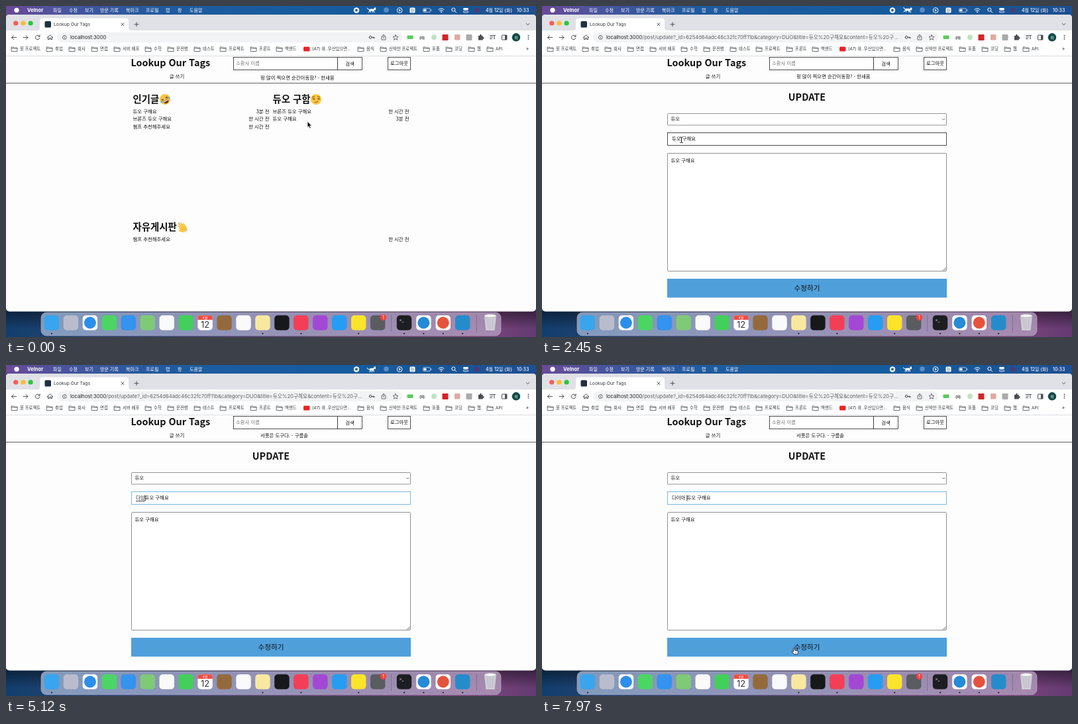
An HTML page that plays this animation: 800x500 px, repeating every 8 s.

```html
<!DOCTYPE html>
<html lang="ko">
<head>
<meta charset="utf-8">
<style>
html, body { margin: 0; width: 100%; height: 100%; overflow: hidden; background: #2d4a80; }
svg { display: block; width: 800px; height: 500px; }
text { white-space: pre; fill: #111; }
.page { font-family: "Noto Sans CJK KR", "Noto Sans", sans-serif; font-size: 7.4px; }
.ui { font-family: Inter, "Noto Sans CJK KR", sans-serif; font-size: 7px; }
.ui text { fill: #33363a; }
.menu text { fill: #fff; font-weight: 500; }
.big { font-size: 14.4px; font-weight: 600; }
.end { text-anchor: end; }
.mid { text-anchor: middle; }
.box { fill: #fff; stroke: #222; stroke-width: .8; }
.line { fill: none; stroke: #4b4e52; stroke-width: 1; stroke-linecap: round; stroke-linejoin: round; }
.white { stroke: #fff; }
.thin { stroke-width: .8; }
.ink { stroke: #6b3d16; stroke-width: .9; }
</style>
</head>
<body>
<svg id="stage" viewBox="0 0 800 500"></svg>
<script>
const text = (x, y, s, cls = '', extra = '') => `<text x="${x}" y="${y}" class="${cls}" ${extra}>${s}</text>`;
const rect = (x, y, w, h, fill, r = 0, extra = '') =>
  `<rect x="${x}" y="${y}" width="${w}" height="${h}" rx="${r}" fill="${fill}" ${extra}/>`;
const box = (x, y, w, h, r = 0, extra = '') =>
  `<rect x="${x}" y="${y}" width="${w}" height="${h}" rx="${r}" class="box" ${extra}/>`;
const dot = (x, y, r, fill, extra = '') => `<circle cx="${x}" cy="${y}" r="${r}" fill="${fill}" ${extra}/>`;
const line = (d, cls = '', extra = '') => `<path d="${d}" class="line ${cls}" ${extra}/>`;
const group = (id, body) => `<g id="${id}">${body}</g>`;
const gradient = (id, stops, extra = '') => `<linearGradient id="${id}" ${extra}>`
  + stops.map(([at, c, o = 1]) => `<stop offset="${at}" stop-color="${c}" stop-opacity="${o}"/>`).join('') + '</linearGradient>';

const URLS = {
  home: '',
  article: '/article/6254d64adc46c32fc70ff11b',
  update: '/post/update?_id=6254d64adc46c32fc70ff11b&amp;category=DUO&amp;title=듀오%20구해요&amp;content=듀오%20구...'
};
const QUOTES = ['핑 많이 찍으면 순간이동함? - 한새움', '서폿은 도구다. - 구름솥'];

function wallpaper() {
  return '<defs>'
    + gradient('sky', [[0, '#6a4a98'], [.13, '#43559d'], [.3, '#1f5b9f'], [.65, '#155c9f'], [1, '#1d4f92']])
    + gradient('ground', [[0, '#123f6e'], [.3, '#3c4570'], [.6, '#674a76'], [.88, '#7d467c'], [1, '#643a72']])
    + gradient('glass', [[0, '#8da5c6'], [.5, '#9c9bbf'], [1, '#ab90b4']])
    + gradient('shade', [[0, '#000', .5], [1, '#000', 0]], 'x2="0" y2="1"')
    + '<clipPath id="ticker"><rect x="340" y="98.5" width="250" height="17.5"/></clipPath></defs>'
    + rect(0, 0, 800, 40, 'url(#sky)') + rect(0, 440, 800, 60, 'url(#ground)') + rect(0, 458, 800, 30, 'url(#shade)');
}

function menuBar() {
  const items = [[71, '파일'], [95, '수정'], [119, '보기'], [142, '방문 기록'], [181, '북마크'],
    [211, '프로필'], [241, '탭'], [259, '창'], [277, '도움말']];
  return '<g class="ui menu">' + dot(16, 6.3, 3.6, '#fff')
    + text(32, 9, 'Velnor', '', 'style="font-weight:700;font-size:7.6px"')
    + items.map(([x, s]) => text(x, 9, s)).join('')
    + dot(529, 6.5, 4.2, '#fff') + rect(527.3, 4.8, 3.4, 3.4, '#1f5b9f', .5)
    + dot(574, 6, 3.8, '#5b8cc4')
    + line('M590.4 6.5a3.8 3.8 0 1 0 7.6 0a3.8 3.8 0 1 0-7.6 0', 'white') + '<path d="M593 4.6l3.2 1.9-3.2 1.9z" fill="#fff"/>'
    + rect(609.5, 2.5, 8, 8, '#fff', 1.5) + text(613.5, 9, '한', 'mid', 'style="fill:#1f559a;font-size:6px"')
    + rect(629.5, 3.7, 11, 5.6, 'none', 1.6, 'stroke="#c9d5ea" stroke-width=".8"') + rect(630.5, 4.7, 4, 3.6, '#fff', .8)
    + rect(641.2, 5.4, 1, 2.2, '#c9d5ea')
    + line('M652.8 5.4q4.2-3.5 8.4 0M654.5 7.2q2.5-2 5 0', 'white') + dot(657, 9, .9, '#fff')
    + line('M672.8 5.6a2.6 2.6 0 1 0 5.2 0a2.6 2.6 0 1 0-5.2 0M677.4 7.6l2.3 2.3', 'white')
    + rect(690, 3, 8, 3, '#fff', 1.5) + rect(690.4, 7.3, 7.2, 2.5, 'none', 1.2, 'stroke="#fff" stroke-width=".8"')
    + dot(711, 6.5, 3.7, '#4d3a70')
    + text(724, 9, '4월 12일 (화)') + text(771, 9, '10:33') + '</g>';
}

function browser() {
  const marks = [[8, '뭉 프로젝트'], [61, '취업'], [95, '회사'], [129, '면접'], [163, '서버 배포'], [210, '수학'],
    [244, '운전병'], [284, '테스트'], [323, '프로젝트'], [369, '프론트'], [408, '백엔드'], [449, '(47) 와..우산있으면...'],
    [531, '음식'], [565, '신박한 프로젝트'], [630, '포폴'], [664, '코딩'], [698, '웹'], [726, 'API']];
  const folder = x => line(`M${x + .5} 62h3l1 1.2h4.5v5.3h-8.5zM${x + .5} 64h8.5`, 'thin');
  const mark = ([x, s]) => (s[0] === '(' ? rect(x, 61.5, 9.5, 7, '#f02323', 1.6) : folder(x)) + text(x + 13, 67.4, s);
  const lights = ['#fc5b57', '#fdbc2e', '#28c840'].map((c, i) => dot(14.7 + i * 11.2, 26, 3.6, c)).join('');
  return rect(0, 13, 800, 448.5, '#fff', 5) + '<path d="M0 37V18q0-5 5-5h790q5 0 5 5v19z" fill="#dfe1e6"/>'
    + '<g class="ui">' + lights
    + '<path d="M47 37q4 0 4-4V23q0-4.5 4.5-4.5h125q4.5 0 4.5 4.5v10q0 4 4 4z" fill="#fff"/>'
    + rect(58.5, 23, 9.5, 9.5, '#20313d', 1.5)
    + text(72, 30.2, 'Lookup Our Tags', '', 'style="font-size:6.8px"')
    + line('M174 25.7l4 4m0-4l-4 4M194 27.7h6M197 24.7v6M785.5 26.5l2.2 2.2 2.2-2.2')
    + line('M15.5 47.5h-7m3-3l-3 3 3 3M26 47.5h7m-3-3l3 3-3 3M50.5 45.7a3.3 3.3 0 1 0 .4 2.5M51 43.8v2.4h-2.4M62.5 47.5l4-3.7 4 3.7M63.5 47v3.7h2v-2.5h2v2.5h2V47')
    + rect(77, 39.5, 521, 15.5, '#f1f3f4', 7.7)
    + line('M85.5 47.5a2.9 2.9 0 1 0 5.8 0a2.9 2.9 0 1 0-5.8 0M88.4 47.2v1.6M88.4 45.7v.1', 'thin')
    + '<text x="97" y="50.1" style="font-size:7.7px;fill:#202124">localhost:3000<tspan id="path" fill="#5f6368"></tspan></text>'
    + rect(543, 40, 54, 14.5, '#f1f3f4', 7)
    + line('M548.2 47.3a1.9 1.9 0 1 0 3.8 0a1.9 1.9 0 1 0-3.8 0M552 47.3h4v1.5M554.3 47.3v1.4')
    + line('M568.5 46h-1.5v5h6v-5h-1.5M570 48.5v-5m-1.8 1.7l1.8-1.8 1.8 1.8', 'thin')
    + line('M588 43.5l1.2 2.6 2.8.3-2.1 1.9.6 2.8-2.5-1.4-2.5 1.4.6-2.8-2.1-1.9 2.8-.3z', 'thin')
    + rect(605.5, 44.5, 9, 5.5, '#58cc5a', 1) + text(628, 49.7, '(o)', 'mid', 'style="font-size:6px;font-weight:700"')
    + dot(646, 47.3, 4, '#bfe3c4') + rect(658.5, 43, 9, 9, '#d32525', 1)
    + rect(677, 43, 8.5, 8.5, '#dfaaa0', 1) + rect(694.5, 43, 9, 9, '#aaa', 1)
    + '<path d="M713 45h2.2a1.4 1.4 0 1 1 2.4 0h2.2v2.2a1.3 1.3 0 1 1 0 2.4v2h-6.8z" fill="#4b4e52"/>'
    + line('M730.5 44.5h6M730.5 47h4M730.5 49.5h3M737 50v-5.5h1.5')
    + rect(748.5, 44, 7.5, 7, 'none', .5, 'stroke="#4b4e52"') + rect(753, 44, 3, 7, '#4b4e52')
    + dot(770, 47.3, 6.2, '#0c4a42') + text(770, 49.7, '하', 'mid', 'style="font-size:6px;fill:#fff"')
    + [44.5, 47.3, 50.1].map(y => dot(788.5, y, .9, '#4b4e52')).join('')
    + `<g style="font-size:6.4px">${marks.map(mark).join('')}</g>` + text(785, 67.2, '»')
    + '</g>' + rect(0, 75, 800, 1, '#dcdee1');
}

function header() {
  return rect(0, 76, 800, 380, '#fdfdfd') + text(188.5, 91.2, 'Lookup Our Tags', 'big')
    + box(343.5, 77.5, 157, 19) + text(347, 89.3, '소환사 이름', '', 'style="fill:#777"')
    + box(500.5, 77.5, 37, 19) + text(519, 89.5, '검색', 'mid')
    + box(576.5, 77.5, 34, 19) + text(593.5, 89.3, '로그아웃', 'mid')
    + text(258, 109.3, '글 쓰기', 'mid')
    + `<g clip-path="url(#ticker)">${text(384, 109.3, '', '', 'id="quote"')}</g>` + rect(0, 116, 800, .7, '#222');
}

const face = (x, y, turn, features) =>
  `<g transform="translate(${x} ${y}) rotate(${turn})">${dot(0, 0, 8, '#fdc640')}${features}</g>`;

function home() {
  const row = (x, end, y, s, when) => text(x, y, s) + text(end, y, when, 'end');
  const laugh = face(240, 141, -30, line('M-5-2.5l3 1.3-3 1.2M5-2.5l-3 1.3 3 1.2', 'ink')
    + '<path d="M-4.5 1.5h9q-.5 5-4.5 5t-4.5-5z" fill="#76341c"/><path d="M-4 2h8v1.3h-8z" fill="#fff"/>'
    + dot(-6.5, 1, 1.5, '#55b9ee') + dot(6.5, 1, 1.5, '#55b9ee'));
  const smirk = face(468, 141, 0, line('M-5.5-3.5l3-.8M5.5-3.5l-3-.8M-5.3-1h3.2M2.1-1h3.2M-2 4.5q3.5.3 5-1.5', 'ink')
    + dot(-3, -.4, .9, '#6b3d16') + dot(4.4, -.4, .9, '#6b3d16'));
  const hand = '<g transform="translate(266.5 335) rotate(-32)" fill="none" stroke="#fbc23c" stroke-width="2.2" stroke-linecap="round">'
    + '<path d="M-3.5 0v-5.5M-.9 0v-7.5M1.7 0v-7M4.3 1v-5M-3 4.5l-3.5-3.5"/><rect x="-3.5" y="0" width="7.8" height="5.5" rx="2.5" fill="#fbc23c"/></g>'
    + line('M259.5 330q.5-2.5 2.5-3.5M273.5 337.5q0 2.5-2.5 4', 'thin', 'style="stroke:#6aaede"');
  return text(191.5, 146.3, '인기글', 'big') + laugh + text(402.5, 146.3, '듀오 구함', 'big') + smirk
    + row(191.5, 397.5, 161.8, '듀오 구해요', '3분 전') + row(191.5, 397.5, 173.4, '브론즈 듀오 구해요', '한 시간 전')
    + row(191.5, 397.5, 185, '챔프 추천해주세요', '한 시간 전')
    + row(402.5, 608.5, 161.8, '브론즈 듀오 구해요', '한 시간 전') + row(402.5, 608.5, 173.4, '듀오 구해요', '3분 전')
    + text(191.5, 339.3, '자유게시판', 'big') + hand + row(191.5, 608.5, 354.8, '챔프 추천해주세요', '한 시간 전');
}

function article() {
  return text(188.5, 143.5, '듀오 구해요', 'big') + text(571.5, 141.5, 'DUO', 'end') + text(611, 141.5, 'views 7', 'end')
    + rect(189, 151, 422, .8, '#222') + text(188.5, 165, '듀오 구해요')
    + box(189.5, 324.5, 421, 18.5) + text(400, 335.8, '수정하기', 'mid')
    + box(189.5, 344, 421, 18.5) + text(400, 355.2, '삭제하기', 'mid');
}

function update() {
  return text(400, 143.2, 'UPDATE', 'big mid')
    + box(189.5, 162.5, 421, 17.5, 1, 'style="stroke:#777"') + text(194.5, 173.4, '듀오')
    + line('M604.5 170.3l1.8 1.8 1.8-1.8', 'thin')
    + box(189.5, 191.5, 421, 19, 0, 'id="field"')
    + '<text x="196" y="203.4"><tspan id="typed"></tspan><tspan>듀오 구해요</tspan></text>'
    + rect(196, 205, 6, .8, '#111', 0, 'id="composing"') + rect(196, 196.5, .8, 9, '#111', 0, 'id="caret"')
    + box(189.5, 222.5, 421, 178, 1, 'style="stroke:#777"') + text(194.5, 236.2, '듀오 구해요')
    + line('M605.5 399.5l4-4M608 399.5l1.5-1.5', 'thin')
    + rect(189, 412, 422, 28.5, '#4f9fdb') + text(400, 429.5, '수정하기', 'mid', 'style="font-size:10.6px"');
}

function dock() {
  const fills = ['#38a5ee', '#b9bccb', '#2b8eea', '#4bd663', '#3493ee', '#7fca76', '#fafafa', '#43cf5b', '#fff', '#946a3d', '#fafafa',
    '#f9e8a0', '#17181a', '#f43e57', '#a348d5', '#269cf3', '#fbe42a', '#5a5c60', '#1d1e21', '#258bd6', '#e4533e', '#258ccb'];
  const onWhite = [2, 6, 19, 20];
  const at = i => i < 18 ? 69 + i * 28.95 : 601 + (i - 18) * 29.4;
  const tile = (x, c) => rect(x - 11.2, 467.3, 22.4, 22.4, c, 5);
  const icon = (c, i) => onWhite.includes(i) ? tile(at(i), '#fafafa') + dot(at(i), 478.5, 9, c) : tile(at(i), c);
  return rect(53, 463, 694, 35, 'url(#glass)', 8, 'stroke="#b9b4cf" stroke-width=".6" fill-opacity=".9"')
    + fills.map(icon).join('')
    + '<path d="M289.400 474v-2q0-4.700 5-4.700h12.400q5 0 5 4.700v2z" fill="#f14c43"/><g class="ui">'
    + text(300.5, 472.5, '4월', 'mid', 'style="fill:#fff;font-size:5px"')
    + text(300.5, 486, '12', 'mid', 'style="font-size:13px"')
    + text(593.5, 477, '&gt;_', '', 'style="fill:#fff;font-size:6px"')
    + dot(569.5, 470.5, 4.7, '#f4423e') + text(569.5, 473, '1', 'mid', 'style="fill:#fff"') + '</g>'
    + rect(581, 467, .7, 25, '#716a8a') + rect(710, 467, .7, 25, '#716284')
    + '<path d="M722 468h18l-2.3 22h-13.4z" fill="#d6d9dd" fill-opacity=".85"/>'
    + '<ellipse cx="731" cy="468" rx="9" ry="2.5" fill="#f4f4f4" stroke="#aaa" stroke-width=".6"/>'
    + line('M727 472l1 15M731 472v15M735 472l-1 15', 'thin', 'style="stroke:#b4b7bf"')
    + [0, 11, 13, 16, 18, 19, 20, 21].map(i => dot(at(i), 494.8, 1.1, '#221c2d')).join('');
}

const cursors = group('arrow', '<path d="M0 0v9l2-1.9 1.5 3.3 1.6-.7-1.5-3.2h2.9z" fill="#000" stroke="#fff" stroke-width=".7"/>')
  + group('hand', '<path d="M-1 .3q1-1 1.8 0l.4 3.2 4 1q1 .4.8 1.8l-.9 3.4H.3L-3 5.8q-.4-1.4.8-1.2l1.5 1z" fill="#fff" stroke="#000" stroke-width=".8" stroke-linejoin="round"/><path d="M1.5 6.3v1.7M3 6.3v1.7" stroke="#000" stroke-width=".5"/>')
  + group('beam', line('M-2-4q1.5 0 2 .8.5-.8 2-.8M0-3.2v7M-2 4.5q1.5 0 2-.8.5.8 2 .8', '', 'style="stroke:#111"'));

const stage = document.getElementById('stage');
stage.innerHTML = wallpaper() + menuBar() + group('runner', '') + browser()
  + `<g class="page">${header()}${group('home', home())}${group('article', article())}${group('update', update())}</g>`
  + dock() + group('cursor', cursors);

const $ = id => document.getElementById(id);
const show = (id, on) => $(id).setAttribute('display', on ? 'inline' : 'none');
const setText = (id, s) => { if ($(id).textContent !== s) $(id).textContent = s; };
const lastStep = (steps, t) => steps.filter(s => s[0] <= t).pop();

const PAGES = [[0, 'home'], [880, 'article'], [1740, 'update']];
const KEYS = [[0, ''], [4200, 'ㄷ'], [4430, '다'], [4640, '당'], [4850, '다이'], [5050, '다잉'], [5270, '다이아'], [5560, '다이아\u00a0']];
const PATH = [[0, 455, 174.5], [150, 455, 174.5], [480, 430, 169.5], [900, 430, 169.5], [1350, 417.5, 338.5],
  [1760, 417.5, 338.5], [2380, 210.5, 202], [2520, 210.5, 202], [2760, 197, 201], [6100, 197, 201],
  [6600, 245, 237], [6900, 245, 237], [7600, 380.5, 427.5], [8000, 380.5, 427.5]];
const FOCUS = 2850, TYPE = 4200, WAKE = 6150, ROLL = 4700, SPACE = 5560;

function pointer(t) {
  const i = PATH.findIndex(p => p[0] > t);
  const [a, b] = [PATH[i - 1], PATH[i]];
  const k = (t - a[0]) / (b[0] - a[0]), e = k * k * (3 - 2 * k);
  return [a[1] + (b[1] - a[1]) * e, a[2] + (b[2] - a[2]) * e];
}

function cursorKind(page, x, y) {
  const within = (x0, y0, x1, y1) => x > x0 && x < x1 && y > y0 && y < y1;
  if (page === 'home') return within(402, 166, 440, 177) ? 'hand' : 'arrow';
  if (page === 'article') return within(189, 324, 611, 363) ? 'hand' : 'arrow';
  if (within(189, 412, 611, 441)) return 'hand';
  return within(189, 191, 611, 211) || within(189, 222, 611, 401) ? 'beam' : 'arrow';
}

function runner(t) {
  const s = Math.sin(t / 200 * Math.PI), reach = 2.5 + 2 * s;
  return `<g transform="translate(552 ${6 - s * .6}) rotate(${s * 8})"><ellipse rx="${4 + s * .5}" ry="1.8" fill="#fff"/>`
    + dot(4.7, -1.3, 1.7, '#fff') + '<path d="M3.8-2.2l.2-2 1 1.2 1-1.2.1 2z" fill="#fff"/>'
    + line(`M-3.5-.5q-2-.2-3-2.3M-3 1l${-reach / 1.5} 2.7M-2 1l${1.5 - reach / 2} 2.7M2.5 1l${reach / 1.5} 2.5M1.5 1l${reach / 2 - 1} 2.7`, 'white') + '</g>';
}

function draw(now) {
  const t = now % 8000;
  const page = lastStep(PAGES, t)[1];
  for (const [, name] of PAGES) show(name, name === page);
  if ($('path').dataset.page !== page) {
    $('path').dataset.page = page;
    $('path').innerHTML = URLS[page];
  }
  $('runner').innerHTML = runner(t);

  setText('quote', QUOTES[t < ROLL ? 0 : 1]);
  const roll = t < ROLL ? 1.5 * Math.max(0, 1 - t / 120) : 16 * Math.max(0, 1 - (t - ROLL) / 420);
  $('quote').setAttribute('y', 109.3 + roll);

  const typed = lastStep(KEYS, t)[1];
  setText('typed', typed);
  const width = page === 'update' && typed ? $('typed').getComputedTextLength() : 0;
  $('caret').setAttribute('x', 196 + width);
  $('composing').setAttribute('width', width);
  show('composing', t >= TYPE && t < SPACE);
  const blink = t < TYPE ? (t - FOCUS) % 1000 < 500 : t < SPACE || (t - SPACE) % 1000 < 500;
  show('caret', t >= FOCUS && blink);
  $('field').style.stroke = t >= FOCUS ? '#5aa7dc' : '#222';

  const [x, y] = pointer(t), kind = cursorKind(page, x, y);
  for (const k of ['arrow', 'hand', 'beam']) show(k, k === kind);
  show('cursor', t < TYPE || t > WAKE);
  $('cursor').setAttribute('transform', `translate(${x} ${y})`);
}

function tick() {
  draw(performance.now());
  requestAnimationFrame(tick);
}
tick();
</script>
</body>
</html>
```
